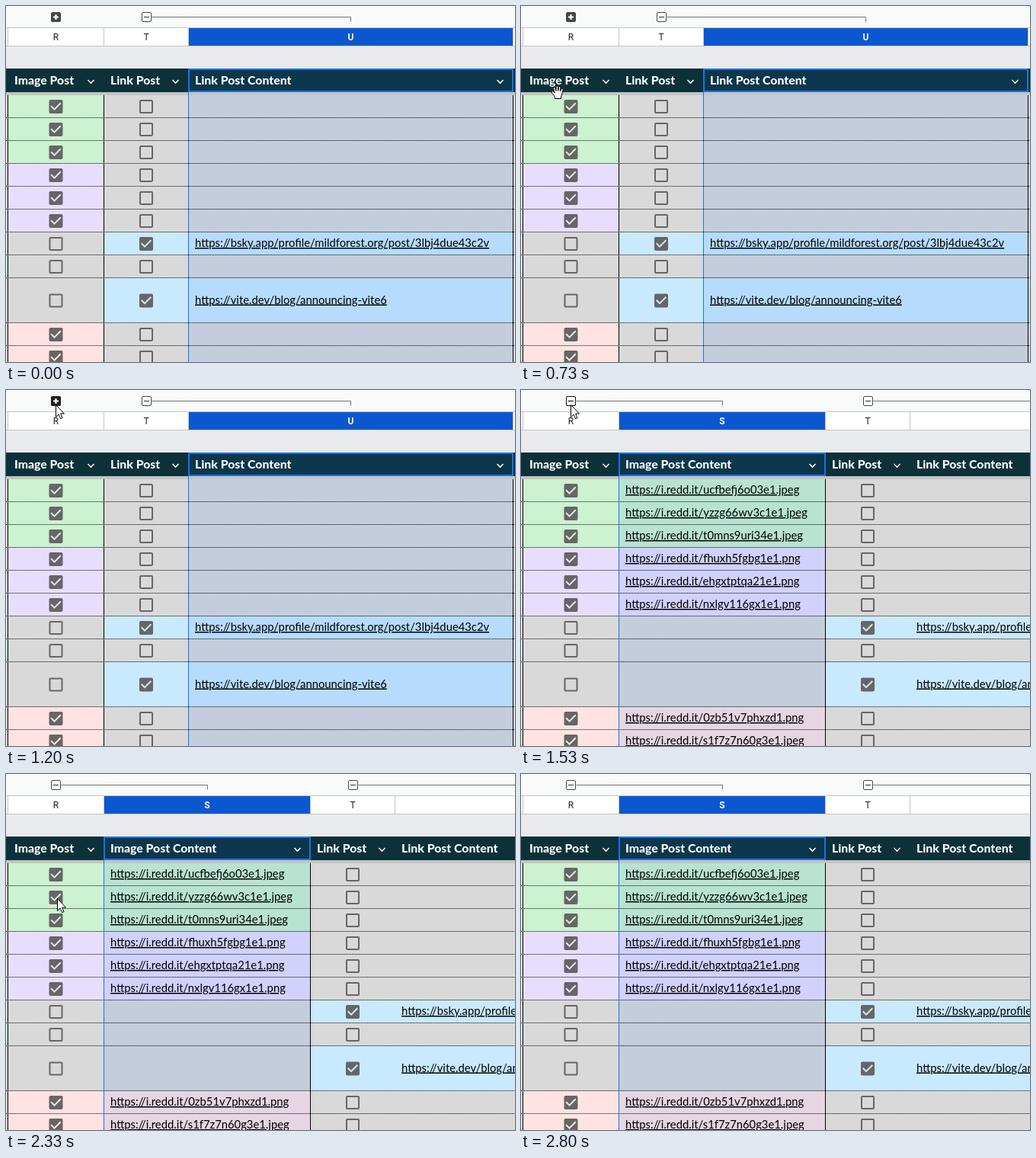
Write an HTML page that moves like this. It is 668 px wide and 467 px high and loops after 3.4 s.

```html
<!DOCTYPE html>
<html lang="en">
<head>
<meta charset="utf-8">
<title>Grouped columns</title>
<style>
html, body { margin: 0; width: 100%; height: 100%; overflow: hidden; background: #e8eaed; }
svg { display: block; width: 668px; height: 467px; }
text { white-space: pre; }
.letter { font: 12px Roboto, Arial, sans-serif; text-anchor: middle; fill: #1f1f1f; }
.letter.on { font-weight: 700; fill: #fff; }
.head { font: 800 15.8px Lato, sans-serif; fill: #fff; }
.link { font: 14.8px Lato, sans-serif; fill: #000; text-decoration: underline;
  text-decoration-thickness: 1px; text-underline-offset: 2px; }
</style>
</head>
<body>
<svg id="stage" viewBox="0 0 668 467"></svg>
<script>
(() => {
const stage = document.getElementById('stage');
const W = 668, H = 467, LOOP = 3400;
const GREY = '#d9d9d9', GREEN = '#ccf2d0', PURPLE = '#e7deff', PINK = '#ffe3e3', BLUE = '#c9e9ff';
const DARK = '#0c3139', ACCENT = '#0b57d0', EDGE = '#1a73e8', ICON = '#444746', TINT = 'rgba(14,101,235,.1)';

function el(parent, tag, attrs, text) {
  const node = document.createElementNS('http://www.w3.org/2000/svg', tag);
  for (const key in attrs) node.setAttribute(key, attrs[key]);
  if (text) node.textContent = text;
  return parent.appendChild(node);
}
const box = (g, x, y, width, height, fill) => el(g, 'rect', { x, y, width, height, fill });
const path = (g, d, attrs) => el(g, 'path', { d, fill: 'none', ...attrs });
const label = (g, x, y, cls, text) => el(g, 'text', { x, y, class: cls }, text);

const image = (fill, name) => ({ fill, image: 'https://i.redd.it/' + name });
const rows = [
  image(GREEN, 'ucfbefj6o03e1.jpeg'),
  image(GREEN, 'yzzg66wv3c1e1.jpeg'),
  image(GREEN, 't0mns9uri34e1.jpeg'),
  image(PURPLE, 'fhuxh5fgbg1e1.png'),
  image(PURPLE, 'ehgxtptqa21e1.png'),
  image(PURPLE, 'nxlgv116gx1e1.png'),
  { link: 'https://bsky.app/profile/mildforest.org/post/3lbj4due43c2v' },
  { other: true },
  { link: 'https://vite.dev/blog/announcing-vite6', h: 59 },
  image(PINK, '0zb51v7phxzd1.png'),
  image(PINK, 's1f7z7n60g3e1.jpeg')
];
let rowTop = 117;
for (const row of rows) {
  row.y = rowTop;
  row.h = row.h || 30;
  row.mid = rowTop + (row.h - 1) / 2;
  rowTop += row.h;
}

const columns = {
  R: { title: 'Image Post', field: 'image', check: true },
  S: { title: 'Image Post Content', field: 'image' },
  T: { title: 'Link Post', field: 'link', check: true },
  U: { title: 'Link Post Content', field: 'link' }
};

function checkbox(g, x, y, on) {
  const frame = 'M19 3H5c-1.1 0-2 .9-2 2v14c0 1.1.9 2 2 2h14c1.1 0 2-.9 2-2V5c0-1.1-.9-2-2-2z';
  const d = on
    ? frame + 'M10 17l-5-5 1.4-1.4 3.6 3.6 7.6-7.6L19 8z'
    : frame + 'M5 5h14v14H5z';
  path(g, d, { fill: '#666', 'fill-rule': 'evenodd', transform: `translate(${x - 12} ${y - 12})` });
}

// One sheet column between two grid lines
function column(g, name, x, end, selected) {
  const col = columns[name], w = end - x - 1, mid = (x + end) / 2 + .5;
  box(g, x + 1, 29, w, 23, selected ? ACCENT : '#fff');
  label(g, mid, 44.5, selected ? 'letter on' : 'letter', name);
  box(g, end, 29, 1, 23, '#c4c7c5');
  for (const row of rows) {
    const value = row[col.field];
    const fill = !value ? GREY : col.field === 'link' ? BLUE : row.fill;
    box(g, x, row.y, w + 1, row.h, fill);
    if (selected) box(g, x, row.y, w + 1, row.h, TINT);
    if (col.check) checkbox(g, mid, row.mid + .5, value);
    else if (value) label(g, x + 9, row.mid + 4.5, 'link', value);
  }
  if (selected) box(g, x, 82, w + 1, 31, TINT);
  label(g, x + 9, 103, 'head', col.title);
  path(g, `M${end - 20.5} 97l4 4 4-4`, { stroke: '#fff', 'stroke-width': 1.6 });
}

function toggle(g, x, plus) {
  el(g, 'rect', {
    x: x - 6, y: 8.5, width: 12, height: 12, rx: 1.5,
    fill: plus ? ICON : '#fff', stroke: ICON
  });
  path(g, `M${x - 3.5} 14.5h7` + (plus ? `M${x} 11v7` : ''),
    { stroke: plus ? '#fff' : ICON, 'stroke-width': plus ? 2 : 1.2 });
}

function bracket(g, x, end) {
  path(g, `M${x + 7} 14.5H${end}v6`, { stroke: '#747775' });
}

function sheet(cols, selected, lines) {
  const g = el(stage, 'g', {});
  box(g, 0, 0, W, 28, '#f9fafa');
  box(g, 0, 28, W, 25, '#c4c7c5');
  box(g, 0, 29, W, 23, '#fff');
  box(g, 2, 29, 1, 23, '#c4c7c5');
  box(g, 0, 53, W, 29, '#e8eaed');
  box(g, 0, 82, W, 31, DARK);
  box(g, 0, 113, W, 4, '#c3c3c3');
  for (const row of rows) box(g, 0, row.y, W, row.h, row.other ? BLUE : GREY);
  for (const [name, x, end] of cols) column(g, name, x, end, name === selected);
  for (const x of lines) box(g, x, 117, 1, H - 117, '#000');
  const [, x, end] = cols.find(c => c[0] === selected);
  box(g, x, 113, 1, H - 113, EDGE);
  for (const row of rows)
    path(g, `M0 ${row.y + row.h - .5}H${W}`, { stroke: '#000', 'stroke-dasharray': '1 1' });
  el(g, 'rect', { x: x + 1, y: 83, width: end - x - 1, height: 29, fill: 'none', stroke: EDGE, 'stroke-width': 2 });
  return g;
}

const folded = sheet([['R', 2, 128], ['T', 128, 239], ['U', 239, 665]], 'U', [2, 128, 665]);
toggle(folded, 65.5, true);
bracket(folded, 184.5, 452.5);
toggle(folded, 184.5);
const plusHover = el(folded, 'g', {});
box(plusHover, 59, 8, 13, 13, '#1f1f1f').setAttribute('rx', 2);
path(plusHover, 'M62 14.5h7M65.5 11v7', { stroke: '#fff', 'stroke-width': 2 });

const unfolded = sheet([['R', 2, 128], ['S', 128, 399], ['T', 399, 510], ['U', 510, 936]], 'S', [2, 399]);
bracket(unfolded, 65.5, 264.5);
toggle(unfolded, 65.5);
bracket(unfolded, 455.5, 723.5);
toggle(unfolded, 455.5);
const minusHover = el(unfolded, 'g', {});
el(minusHover, 'rect', { x: 59.5, y: 8.5, width: 12, height: 12, rx: 1.5, fill: '#fff', stroke: '#111' });
path(minusHover, 'M62 14.5h7', { stroke: '#111', 'stroke-width': 1.2 });

const ink = { fill: '#fff', stroke: '#000', 'stroke-linejoin': 'round' };
const arrow = path(stage, 'M.5.5V16.5L4.1 13.1 6.6 18.6 9 17.6 6.6 12.1H11.5Z', ink);
const hand = path(stage, 'M-3.5 8.5V6.5C-5 4-7 1.5-7.8 0C-8.3-1.6-6.5-2-5.5-.8L-3.8 1-5.4-4.6' +
  'C-5.8-6.6-3.8-7-3.2-5.2L-2-1.5-1.9-7C-1.9-8.8.5-8.8.5-7L.7-1.6 1.7-6.6' +
  'C2.1-8.2 4.2-7.8 3.9-6L3.3-1 5-4C5.9-5.4 7.8-4.4 7.1-2.8C6 0 5.6 4 4.5 6V8.5Z', ink);

// Pointer stops: tick, x, y
const upward = [[6, 323, 409], [7, 256, 350], [8, 160, 275], [9, 68, 205], [10, 5, 148],
  [11, 48, 113], [12, 63, 104], [13, 72, 89], [14, 70, 62], [15, 67, 40], [16, 66, 24],
  [18, 65, 19]];
const downward = [[31, 66, 26], [32, 66, 48], [33, 66, 90], [34, 67, 122],
  [35, 67, 163], [36, 67, 222], [37, 68, 292], [38, 68, 367], [39, 68, 405], [40, 69, 434], [41, 69, 456]];
const stops = [...upward, ...downward];

const show = (node, on) => node.setAttribute('visibility', on ? 'inherit' : 'hidden');

function draw(ms) {
  // The pointer is sampled 15 times a second
  const tick = Math.floor((ms % LOOP + 5) * .015);
  const visible = tick >= 6 && tick < 42;
  const expanded = tick >= 23;
  show(folded, !expanded);
  show(unfolded, expanded);
  show(plusHover, !expanded && tick >= 18);
  show(minusHover, expanded && tick < 31);
  const [, x, y] = stops.filter(s => s[0] <= tick).pop() || stops[0];
  const overHead = y >= 82 && y < 114;
  const pointer = overHead ? hand : arrow;
  pointer.setAttribute('transform', `translate(${x} ${y})`);
  show(hand, visible && overHead);
  show(arrow, visible && !overHead);
}

const start = performance.now();
function loop() {
  draw(performance.now() - start);
  requestAnimationFrame(loop);
}
loop();
})();
</script>
</body>
</html>
```
